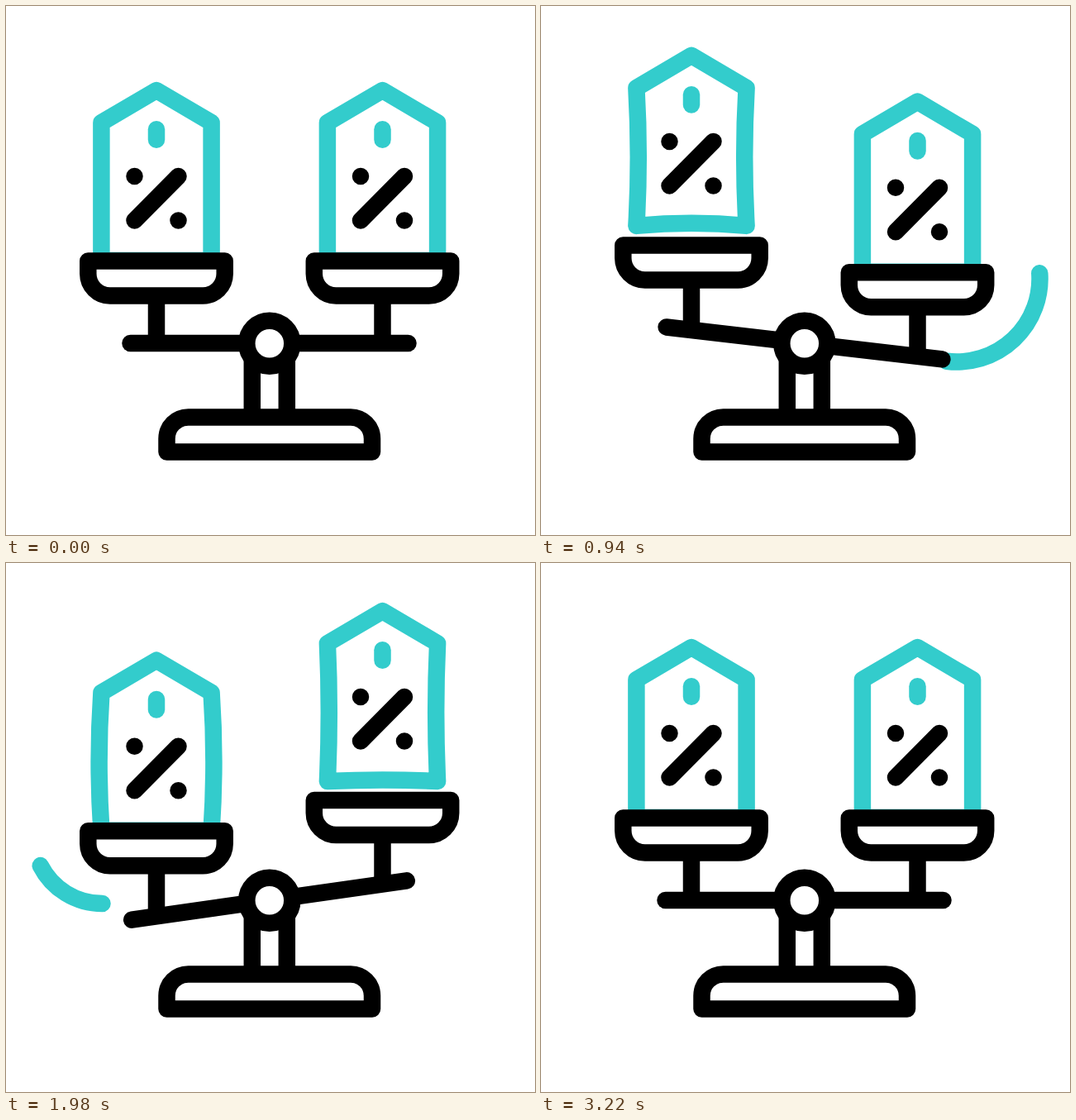
Animation of 640x640 px, one loop 3500 ms. Source, as an HTML page:

```html
<!DOCTYPE html>
<html lang="en">
<head>
<meta charset="utf-8">
<title>Discount scales</title>
<style>
  html, body { margin: 0; width: 100%; height: 100%; overflow: hidden; background: #fff; }
  svg { display: block; width: 100%; height: 100%; }
  .line { fill: none; stroke: #000; stroke-width: 20.5; stroke-linecap: round; stroke-linejoin: round; }
  .teal { stroke: #3cc; }
  .solid { fill: #fff; }
  .flat { stroke-linecap: butt; }
</style>
</head>
<body>
<svg viewBox="0 0 640 640">
  <defs>
    <g id="print">
      <path class="line teal" d="M182 149.3V161.7"/>
      <path class="line" d="M155.5 259.5L208.5 206M155.5 206h.01M208.5 259.5h.01"/>
    </g>
    <g id="pan">
      <path class="line flat" d="M182 350V405"/>
      <path class="line solid" d="M99.3 308.5H264.7V324a26.5 26.5 0 0 1-26.5 26.5H125.8a26.5 26.5 0 0 1-26.5-26.5Z"/>
    </g>
  </defs>
  <path id="arcR" class="line teal"/>
  <path id="arcL" class="line teal"/>
  <g id="tagL"><path class="line teal"/><use href="#print"/></g>
  <g id="tagR"><path class="line teal"/><use href="#print"/></g>
  <use id="panL" href="#pan"/>
  <use id="panR" href="#pan"/>
  <path id="beam" class="line" d="M150.5 408H486.5"/>
  <path class="line flat" d="M297.8 420V492M339.8 420V492"/>
  <path class="line solid" d="M194.5 539.5V523.5a26 26 0 0 1 26-26H417a26 26 0 0 1 26 26V539.5Z"/>
  <circle class="line solid" cx="318.8" cy="408.2" r="27.5"/>
</svg>
<script>
const LOOP = 3500, GAP = 273.5;
const $ = id => document.getElementById(id);

// Eased value at time t from [time, value] keys
function ease(t, ...keys) {
  if (t <= keys[0][0]) return keys[0][1];
  for (let i = 1; i < keys.length; i++) {
    const [t0, a] = keys[i - 1], [t1, b] = keys[i];
    if (t < t1) {
      const u = (t - t0) / (t1 - t0);
      return a + (b - a) * u * u * (3 - 2 * u);
    }
  }
  return keys[keys.length - 1][1];
}

// One full rock of the scales: rest, right side low, left side low, rest
const rock = (t, a, b) => ease(t, [200, 0], [710, a], [1742, b], [2600, 0]);

function place(id, x, y) {
  $(id).setAttribute("transform", `translate(${x} ${y.toFixed(2)})`);
}

function drawTag(id, x, y, bowL, bowR, arch) {
  const l = 115.4, r = 248.6;
  place(id, x, y);
  $(id).firstElementChild.setAttribute("d",
    `M${l} 308Q${l - 2 * bowL} 225 ${l} 141.2L182 102L${r} 141.2` +
    `Q${r + 2 * bowR} 225 ${r} 308Q182 ${308 + 2 * arch} ${l} 308Z`);
}

function drawArc(id, cx, cy, r, from, to, tail, head) {
  const point = k => {
    const a = (from + (to - from) * k) * Math.PI / 180;
    return `${(cx + r * Math.cos(a)).toFixed(2)} ${(cy + r * Math.sin(a)).toFixed(2)}`;
  };
  $(id).setAttribute("d", head - tail < 0.002 ? "" :
    `M${point(tail)}A${r} ${r} 0 0 ${to > from ? 1 : 0} ${point(head)}`);
}

function draw(t) {
  $("beam").setAttribute("transform", `rotate(${rock(t, 9.1, -10)} 318.8 408)`);

  const panL = rock(t, -24.5, 19.4), panR = rock(t, 19.6, -26.5);
  place("panL", 0, panL);
  place("panR", GAP, panR);

  // Each tag rides its pan, then floats above it and drops back
  const hopL = t < 1735 ? ease(t, [200, 0], [985, -42.5], [1040, -42.5], [1735, 19.4]) : panL;
  const hopR = t < 800 ? panR : ease(t, [800, 19.6], [2140, -46.5], [2736, 0]);
  const bow = ease(t, [700, 0], [1040, -3], [1790, 4.2], [1830, 4.2], [2220, 0]);
  const bowL = ease(t, [1750, 0], [2140, -3], [2780, 2.7], [2890, 2.7], [3220, 0]);
  const bowR = ease(t, [1750, 0], [2140, -3], [2780, 3], [2890, 3], [3010, 6.2], [3220, 0]);
  drawTag("tagL", 0, Math.min(hopL, panL), bow, bow,
    ease(t, [720, 0], [1000, -3.5], [1240, -3.5], [1600, 0]));
  drawTag("tagR", GAP, Math.min(hopR, panR), bowL, bowR,
    ease(t, [1800, 0], [2140, -3], [2600, 0]));

  drawArc("arcR", 503, 330, 100.5, -15.5, 97,
    ease(t, [850, 0], [1305, 1]), ease(t, [440, 0], [860, 1]));
  drawArc("arcL", 116.5, 328, 84, 197, 90,
    ease(t, [1785, 0], [2230, 1]), ease(t, [1370, 0], [1785, 1]));
}

const start = performance.now();
function tick() {
  draw((performance.now() - start) % LOOP);
  requestAnimationFrame(tick);
}
tick();
</script>
</body>
</html>
```
